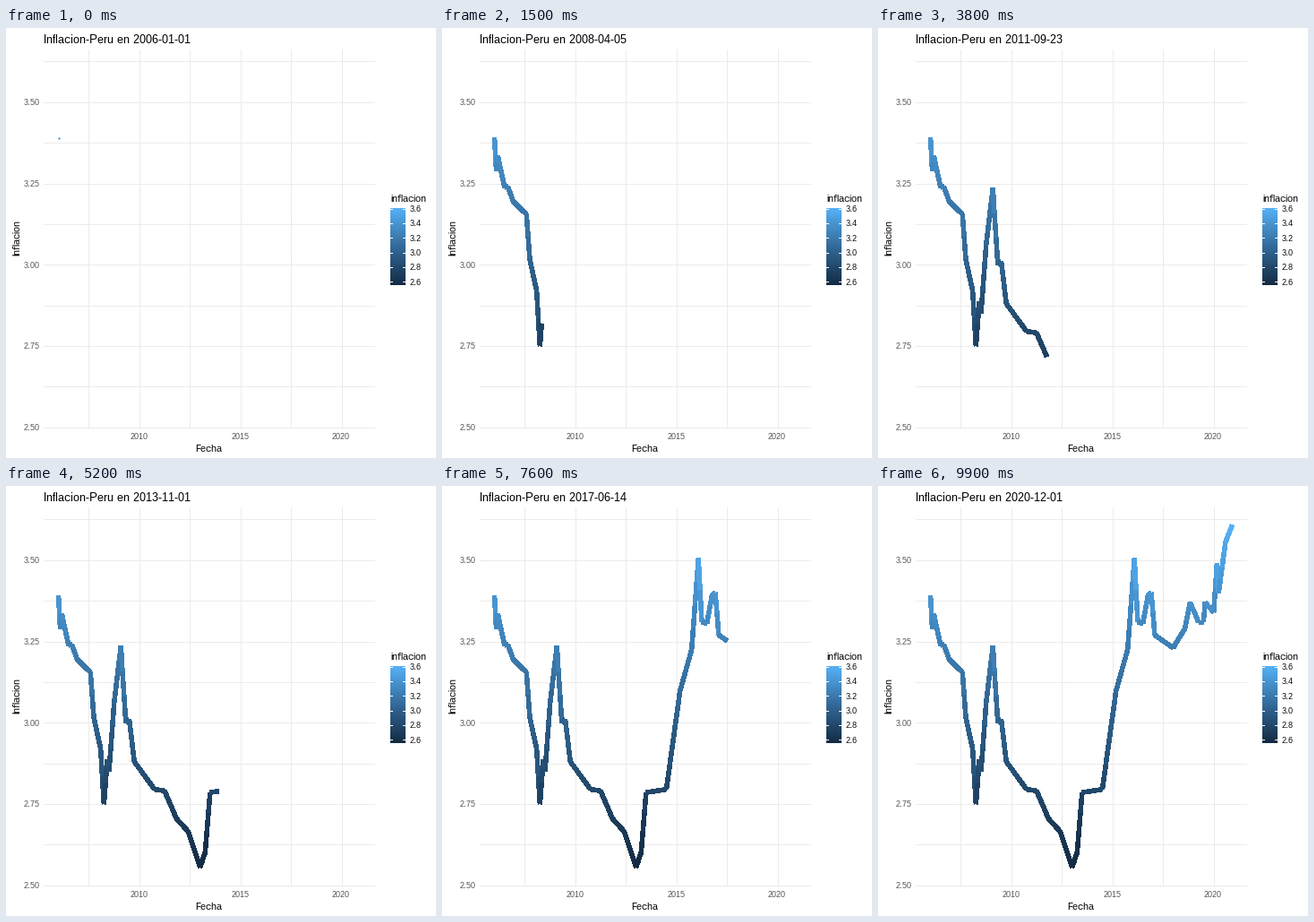
Animation of 480 by 480 pixels, one loop 10 s. Source, as a matplotlib script:

```python
import numpy as np
import matplotlib.pyplot as plt
from matplotlib.animation import FuncAnimation
from matplotlib.collections import LineCollection
from matplotlib.colors import LinearSegmentedColormap

plt.rcParams.update({
    "font.family": "Liberation Sans",
    "text.hinting": "native",
    "text.hinting_factor": 1,
})

SIZE, DPI = 480, 72
FRAMES, INTERVAL = 100, 100
LEFT, RIGHT, TOP, BOTTOM = 42, 412, 24, 446
LOW, HIGH = 2.555, 3.608
GRID, GREY = "#EBEBEB", "#4D4D4D"
BLUES = LinearSegmentedColormap.from_list(
    "blues", ["#132B43", "#336A98", "#56B1F7"])

# Main turning points: (months since start, rate)
TURNS = [
    (0, 3.39), (1, 3.29), (2, 3.335), (6, 3.238), (8, 3.24), (11, 3.195),
    (19, 3.155), (21, 3.015), (25, 2.92), (27, 2.75), (29, 2.885),
    (30, 2.85), (33, 3.06), (37, 3.235), (40, 3.0), (42, 3.01), (45, 2.88),
    (57, 2.795), (63, 2.79), (70, 2.705), (77, 2.665), (84, 2.555),
    (87, 2.6), (90, 2.785), (102, 2.795), (110, 3.095), (117, 3.225),
    (121, 3.505), (123, 3.31), (126, 3.305), (129, 3.39), (131, 3.4),
    (133, 3.27), (144, 3.23), (151, 3.29), (154, 3.37), (159, 3.31),
    (162, 3.31), (163, 3.37), (168, 3.34), (170, 3.49), (171, 3.4),
    (175, 3.555), (179, 3.608),
]

START = np.datetime64("2006-01-01")
months = np.arange("2006-01", "2021-01", dtype="datetime64[M]")
days = (months.astype("datetime64[D]") - START).astype(int)
SPAN = int(days[-1])
rates = np.interp(np.arange(len(days)), *zip(*TURNS))


def px(day):
    return 58.6 + 336.8 * day / SPAN


def py(rate):
    return 445.6 - 362.8 * (rate - 2.5)


def year_px(year):
    return px((np.datetime64(f"{year}-01-01") - START).astype(int))


def tint(rate):
    return BLUES((np.asarray(rate) - LOW) / (HIGH - LOW))


def pixel(v):
    """Centre of the pixel nearest to v."""
    return np.floor(v + 0.5) + 0.5


fig = plt.figure(figsize=(SIZE / DPI, SIZE / DPI), dpi=DPI, facecolor="white")
ax = fig.add_axes([0, 0, 1, 1])
ax.axis("off")


def label(x, y, text, size, color="black", **kw):
    return ax.text(x, y, text, size=size, color=color, va="baseline", **kw)


def rule(xs, ys, color, z=1):
    ax.plot(xs, ys, color=color, lw=1, snap=False, zorder=z,
            solid_capstyle="butt")


# Panel grid and axis labels
for rate in np.arange(2.5, 3.7, 0.125):
    y = py(rate)
    rule([LEFT, RIGHT], [pixel(y)] * 2, GRID)
    if rate % 0.25 == 0:
        label(37.5, np.floor(y) + 4, f"{rate:.2f}", 9, GREY, ha="right")
half_step = (year_px(2015) - year_px(2010)) / 2
for year in (2010, 2015, 2020):
    x = year_px(year)
    for gx in (x, x - half_step):
        rule([pixel(gx)] * 2, [TOP, BOTTOM], GRID)
    label(x - 0.7, 459, str(year), 9, GREY, ha="center")

label(226.5, 473, "Fecha", 11, ha="center")
ax.text(17, 234.5, "Inflacion", size=11, rotation=90, ha="right", va="center")

# Colour bar
label(429, 194, "inflacion", 11)
ax.imshow(BLUES(np.linspace(1, 0, 256))[:, None], aspect="auto",
          extent=(429, 446, 287, 201), zorder=2)
for rate in np.arange(2.6, 3.7, 0.2):
    y = 287 - 86 * (rate - LOW) / (HIGH - LOW)
    for x in (429, 443):
        rule([x, x + 3], [pixel(y)] * 2, "white", 3)
    label(451, np.floor(y) + 4, f"{rate:.1f}", 9)

ax.set_xlim(0, SIZE)
ax.set_ylim(SIZE, 0)

# Series
points = np.column_stack([px(days), py(rates)])
segments = np.stack([points[:-1], points[1:]], axis=1)
colors = tint(rates[:-1])
trail = LineCollection([], linewidths=4.5, antialiaseds=False,
                       capstyle="butt", zorder=4)
ax.add_collection(trail, autolim=False)
dot, = ax.plot([58.5], [122.5], "o", ms=2.4, mew=0, snap=False,
               color=tint(rates[0]), zorder=4)
title = label(42, 17, "", 13)


def update(i):
    elapsed = SPAN * i / (FRAMES - 1)
    shown = np.searchsorted(days, elapsed)
    trail.set_segments(segments[:shown])
    trail.set_color(colors[:shown])
    dot.set_visible(i == 0)
    title.set_text(f"Inflacion-Peru en {START + int(elapsed)}")
    return trail, dot, title


anim = FuncAnimation(fig, update, frames=FRAMES, interval=INTERVAL,
                     repeat=True, repeat_delay=0)
plt.show()
```
